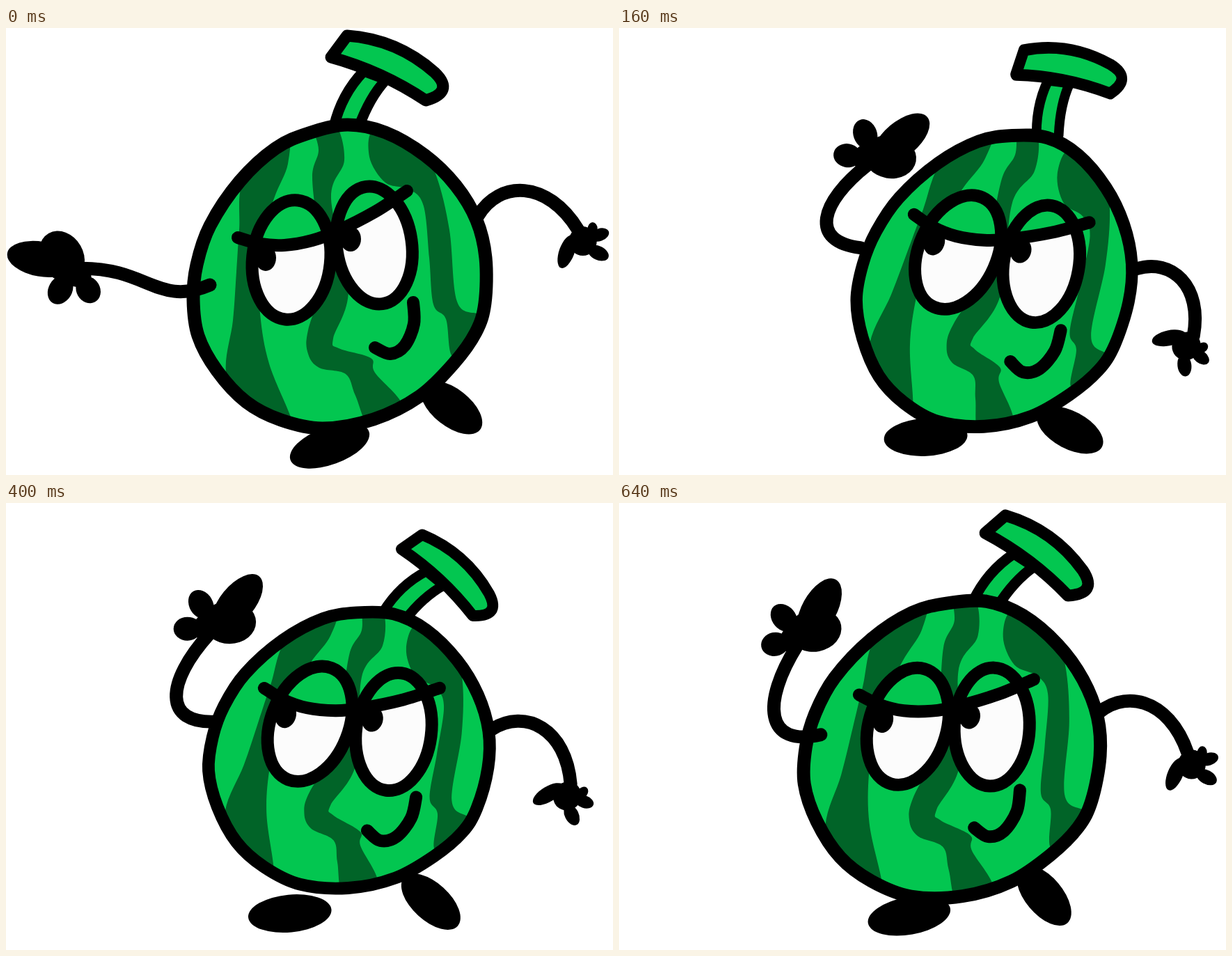
Animation, 872 px wide and 642 px high, one loop 0.68 s. Source, as an HTML page with a canvas:

```html
<!DOCTYPE html>
<html lang="en">
<head>
<meta charset="utf-8">
<title>Waving melon</title>
<style>
  html, body { margin: 0; height: 100%; overflow: hidden; background: #fff; }
  canvas { display: block; }
</style>
</head>
<body>
<canvas id="stage" width="872" height="642"></canvas>
<script>
const ctx = document.getElementById('stage').getContext('2d');
const LOOP = 680, STEP = 40;
const LIGHT = '#03c650', DARK = '#016428', WHITE = '#fcfcfc', BLACK = '#000';
const rad = degrees => degrees * Math.PI / 180;

// Smooth curve through points written as "x,y x,y".
function curve(text, closed = true) {
  const p = text.split(' ').map(pair => pair.split(',').map(Number));
  const n = p.length, path = new Path2D();
  const at = i => closed ? p[(i + n) % n] : p[Math.max(0, Math.min(n - 1, i))];
  path.moveTo(...p[0]);
  for (let i = 0; i < (closed ? n : n - 1); i++) {
    const [a, b, c, d] = [at(i - 1), at(i), at(i + 1), at(i + 2)];
    path.bezierCurveTo(
      b[0] + (c[0] - a[0]) / 6, b[1] + (c[1] - a[1]) / 6,
      c[0] - (d[0] - b[0]) / 6, c[1] - (d[1] - b[1]) / 6, ...c);
  }
  return path;
}

function oval(x, y, rx, ry, degrees = 0) {
  const path = new Path2D();
  path.ellipse(x, y, rx, ry, rad(degrees), 0, 7);
  return path;
}

const shell = curve('490,139 545,150 602,183 646,226 676,276 689,330 688,395 675,437 643,482 594,529 528,562 455,575 395,563 345,537 303,492 276,442 269,390 274,340 293,284 336,220 387,173 435,151');
const stripes = [
  curve('342,215 335,290 331,350 326,420 316,495 340,570 412,580 408,556 378,482 365,410 362,320 385,245 405,195 402,150'),
  curve('443,140 449,176 440,215 450,300 460,350 434,434 434,468 450,488 488,497 502,528 525,575 570,545 530,495 524,474 478,460 470,446 492,375 467,245 486,190 474,140'),
  curve('530,145 522,185 545,222 580,232 600,256 608,330 614,397 632,418 640,470 665,475 705,420 680,411 648,393 637,290 618,212 590,160')
];
const stemStick = new Path2D('M471 142 Q482 95 514 62 L546 74 Q522 100 507 142');
const stemCap = new Path2D('M490 11 Q562 16 616 64 Q645 92 603 104 Q540 62 467 42 Z');
const eyes = [
  { rim: oval(410, 333, 56, 86, 6), pupil: oval(373, 330, 15, 19) },
  { rim: oval(529, 312, 54, 85, -8), pupil: oval(495, 303, 15, 18) }
];
const browLine = '333,301 365,310 400,312 440,305 475,292 530,264 576,234';
const brow = curve(browLine, false);
const lid = curve(browLine + ' 600,150 333,150', false);
const mouth = curve('585,394 586,425 573,456 552,468 530,459', false);
const foot = { left: [oval(0, 0, 60, 27, -20)], right: [oval(0, 0, 52, 27, 38)] };
const hand = {
  left: [oval(-11, -29, 49, 25, 10), oval(19, -33, 31, 38, -30), oval(35, -9, 28, 18, 25), oval(17, 15, 17, 22, 30), oval(57, 15, 17, 20, -30)],
  right: [oval(-22, 11, 11, 25, 20), oval(1, -4, 20, 21), oval(25, -13, 14, 9, -20), oval(23, 13, 16, 10, 25), oval(15, -22, 7, 9)]
};

function fill(path, color) {
  ctx.fillStyle = color;
  ctx.fill(path);
}

function stroke(path, width) {
  ctx.lineWidth = width;
  ctx.stroke(path);
}

function place(at, angle, draw, [sx, sy] = [1, 1], pivot = { x: 0, y: 0 }) {
  ctx.save();
  ctx.translate(at.x, at.y);
  ctx.rotate(rad(angle));
  ctx.scale(sx, sy);
  ctx.translate(-pivot.x, -pivot.y);
  draw();
  ctx.restore();
}

function clipped(path, draw) {
  ctx.save();
  ctx.clip(path);
  draw();
  ctx.restore();
}

const blacken = shapes => () => shapes.forEach(s => fill(s, BLACK));

const polar = (from, length, degrees) => ({
  x: from.x + length * Math.cos(rad(degrees)),
  y: from.y + length * Math.sin(rad(degrees))
});

// Handles are given along and across the line from shoulder to wrist.
function drawArm(from, to, a1, b1, a2, b2) {
  const dx = to.x - from.x, dy = to.y - from.y;
  const handle = (a, b) => [from.x + a * dx - b * dy, from.y + a * dy + b * dx];
  const path = new Path2D();
  path.moveTo(from.x, from.y);
  path.bezierCurveTo(...handle(a1, b1), ...handle(a2, b2), to.x, to.y);
  stroke(path, 19);
}

function drawStem() {
  for (const [path, width] of [[stemStick, 15], [stemCap, 17]]) {
    fill(path, LIGHT);
    stroke(path, width);
  }
}

function drawBody() {
  fill(shell, LIGHT);
  clipped(shell, () => stripes.forEach(s => fill(s, DARK)));
  stroke(shell, 19);
}

function drawFace() {
  for (const { rim, pupil } of eyes) {
    clipped(rim, () => {
      fill(rim, WHITE);
      fill(pupil, BLACK);
      fill(lid, LIGHT);
    });
    stroke(rim, 18);
  }
  stroke(brow, 18);
  stroke(mouth, 18);
}

function render(t) {
  const ease = (from, to) => {
    const u = Math.max(0, Math.min(1, (t - from) / (to - from)));
    return (1 - Math.cos(Math.PI * u)) / 2;
  };
  // The wind-up, then the slower returns of body, arms and tilt.
  const rise = Math.min(1, t / 160), lunge = rise ** 4;
  const slide = ease(160, 500), swing = ease(160, 640), settle = ease(240, 640);
  const squash = Math.sin(Math.PI * Math.max(0, (t - 200) / 440) ** 1.5);

  const tilt = 17 * rise - 7.2 * settle;
  const scale = [1 - .093 * rise + .09 * settle, 1 - .074 * squash];
  const body = { x: 499 + 47 * lunge - 54 * slide, y: 403 + 9.5 * (lunge - slide) - 4 * squash };
  // A point carried along by the body and shifted by its tilt.
  const attach = (x, y, kx, ky) => ({ x: body.x + x + kx * tilt, y: body.y + y + ky * tilt });
  const onGround = (x, kx, y) => ({ x: body.x + x + kx * tilt, y });

  ctx.fillStyle = '#fff';
  ctx.fillRect(0, 0, 872, 642);
  ctx.lineCap = ctx.lineJoin = 'round';

  place(onGround(-34, -4.2, 600 - .72 * tilt), tilt, blacken(foot.left));
  place(onGround(141, -2.3, 545 + 1.9 * tilt), 22 * ease(160, 560) - 10 * rise, blacken(foot.right));

  const rightShoulder = attach(179, -133, 1.1, 3.9);
  const rightHand = polar(rightShoulder, 155 - 24 * rise + 26 * swing, 15 + 44 * rise - 32 * swing);
  const rightTurn = 58 * rise - 55 * settle;
  drawArm(rightShoulder, polar(rightHand, 21, rightTurn - 106), .16, -.38, .63, -.45);
  place(rightHand, rightTurn, blacken(hand.right));

  const stemAngle = 35 * ease(160, 320) - 15.5 * rise - 7 * ease(320, 640);
  place(attach(-9, -267 + 20 * squash, 4.6, .4), stemAngle, drawStem, scale, { x: 490, y: 136 });
  place(body, tilt, drawBody, scale, { x: 499, y: 403 });
  place(attach(-19, -46 + 4 * squash, tilt / 15, 0), tilt * 1.06, drawFace, [1, 1], { x: 480, y: 357 });

  const leftShoulder = attach(-206, -34, .4, -3.7);
  const leftHand = polar(leftShoulder, 232 - 63 * rise ** 2 + 13 * swing, 182 + 98 * rise - 20.5 * swing);
  const leftTurn = 130 * rise - 21 * swing;
  drawArm(leftShoulder, polar(leftHand, 51, leftTurn - 18),
    .37 - .35 * rise, -.22 - .4 * rise, .5, .065 - .6 * rise);
  place(leftHand, leftTurn, blacken(hand.left));
}

const start = performance.now();
function tick() {
  const t = (performance.now() - start) % LOOP;
  render(Math.floor(t / STEP) * STEP);
  requestAnimationFrame(tick);
}
tick();
</script>
</body>
</html>
```
